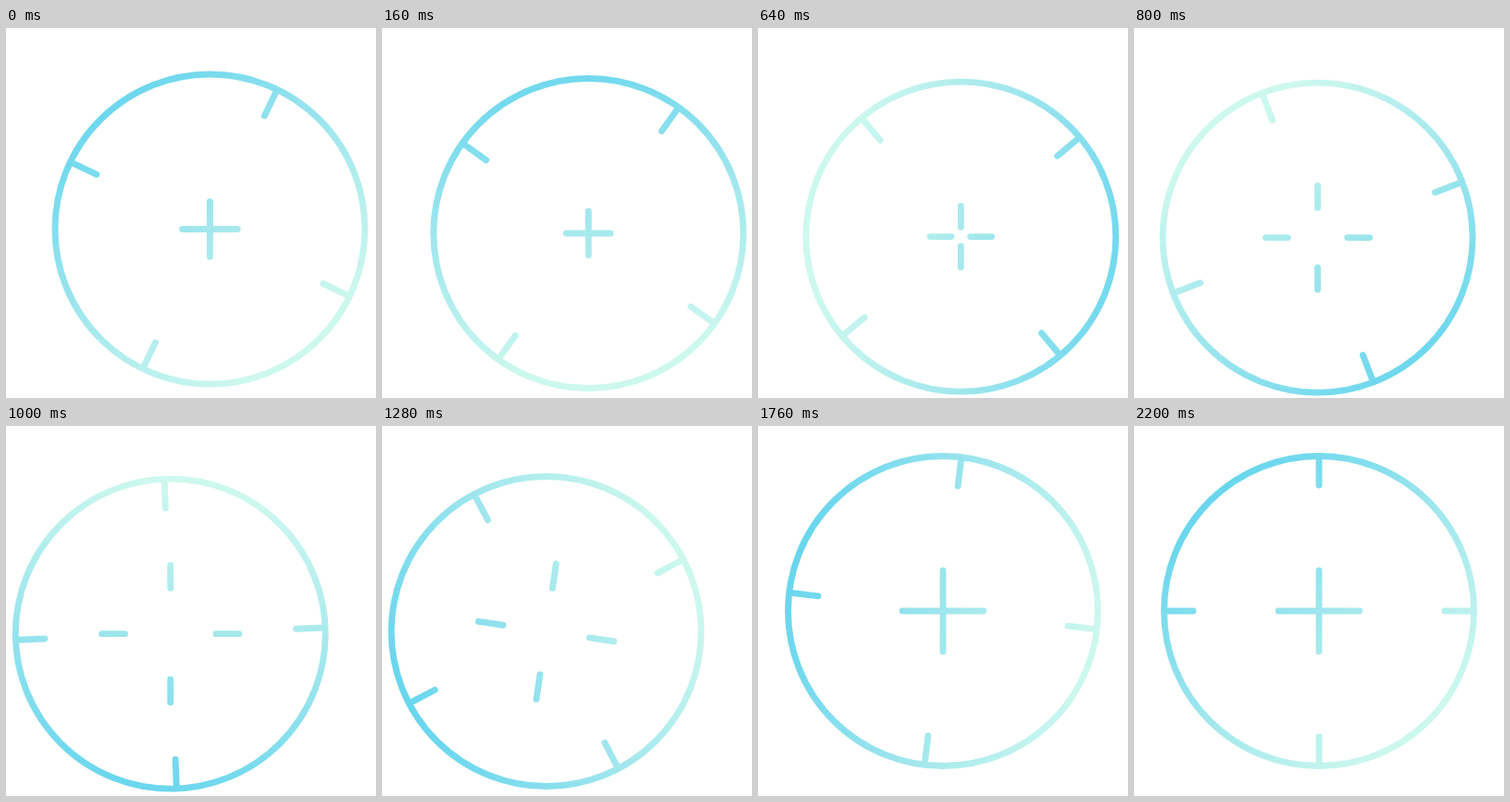
Animation of 400x400 px, one loop 2.24 s. Source, as an HTML page with a canvas:

```html
<!DOCTYPE html>
<html lang="en">
<head>
<meta charset="utf-8">
<title>Crosshair</title>
<style>
  html, body { margin: 0; width: 100%; height: 100%; overflow: hidden; background: #fff; }
  canvas { display: block; width: 100vw; height: 100vh; }
</style>
</head>
<body>
<canvas id="stage" width="400" height="400"></canvas>
<script>
const LOOP = 2240, STEP = 40;
const RADIUS = 167.5, TICK_END = 136, STROKE = 6.9;
const ctx = document.getElementById('stage').getContext('2d');

const rad = deg => deg * Math.PI / 180;
const cubicOut = p => 1 - (1 - p) ** 3;
const cubicInOut = p => p < 0.5 ? 4 * p ** 3 : 1 - 4 * (1 - p) ** 3;
const smooth = p => p * p * (3 - 2 * p);

function tween(t, from, to, ease) {
  return ease(Math.min(1, Math.max(0, (t - from) / (to - from))));
}

// The sight drifts down and right, sweeps left, then returns to the centre.
// The loop opens with the first drift already under way.
function pose(t) {
  const rest = 1 - tween(t, -298, 606, cubicOut);
  const sweep = tween(t, 402, 1181, cubicInOut);
  const open = tween(t, 308, 1213, cubicInOut);
  const back = tween(t, 1175, 1735, smooth);
  return {
    x: 225 - 15 * rest - 49.7 * sweep + 24.7 * back,
    y: 225 - 25 * rest + 2 * Math.sin(Math.PI * sweep) - 0.7 * sweep - 24.3 * back,
    arm: 22.7 + 78 * rest * rest + 2.3 * sweep + 18.8 * back,
    gap: 52 * open * (1 - back),
    spin: 90 * back,
    ring: 45 * tween(t, -245, 751, cubicOut) + 45 * sweep
      - 90 * tween(t, 1160, 2200, cubicOut),
    // One turn per loop, fastest halfway through.
    tint: 360 * t / LOOP - 38 * Math.cos(2 * Math.PI * (t - 100) / LOOP),
    lean: 42 * Math.exp(-(((t - 430) / 420) ** 2))
  };
}

// Linear gradient around the sight, pushed towards its blue end by lean.
function tintPaint({ x, y, tint, lean }) {
  const dx = Math.sin(rad(tint)), dy = -Math.cos(rad(tint));
  const near = lean + 168, far = lean - 168;
  const paint = ctx.createLinearGradient(
    x + dx * near, y + dy * near, x + dx * far, y + dy * far);
  paint.addColorStop(0, '#69d6ee');
  paint.addColorStop(0.5, '#9fe6ed');
  paint.addColorStop(1, '#cdf8ee');
  return paint;
}

// Four equal strokes pointing away from the centre.
function spokes(x, y, deg, from, to) {
  for (let k = 0; k < 4; k++) {
    const a = rad(deg + 90 * k), sx = Math.sin(a), sy = -Math.cos(a);
    ctx.moveTo(x + sx * from, y + sy * from);
    ctx.lineTo(x + sx * to, y + sy * to);
  }
}

function draw(t) {
  const s = pose(t);
  ctx.clearRect(0, 0, 400, 400);
  ctx.strokeStyle = tintPaint(s);
  ctx.lineWidth = STROKE;
  ctx.lineCap = 'round';
  ctx.beginPath();
  ctx.arc(s.x, s.y, RADIUS, 0, 2 * Math.PI);
  spokes(s.x, s.y, s.ring, RADIUS, TICK_END);
  spokes(s.x, s.y, s.spin, s.gap, s.gap + s.arm);
  ctx.stroke();
}

const start = performance.now();
function tick() {
  const t = (performance.now() - start) % LOOP;
  draw(Math.floor(t / STEP) * STEP);
  requestAnimationFrame(tick);
}
tick();
</script>
</body>
</html>
```
